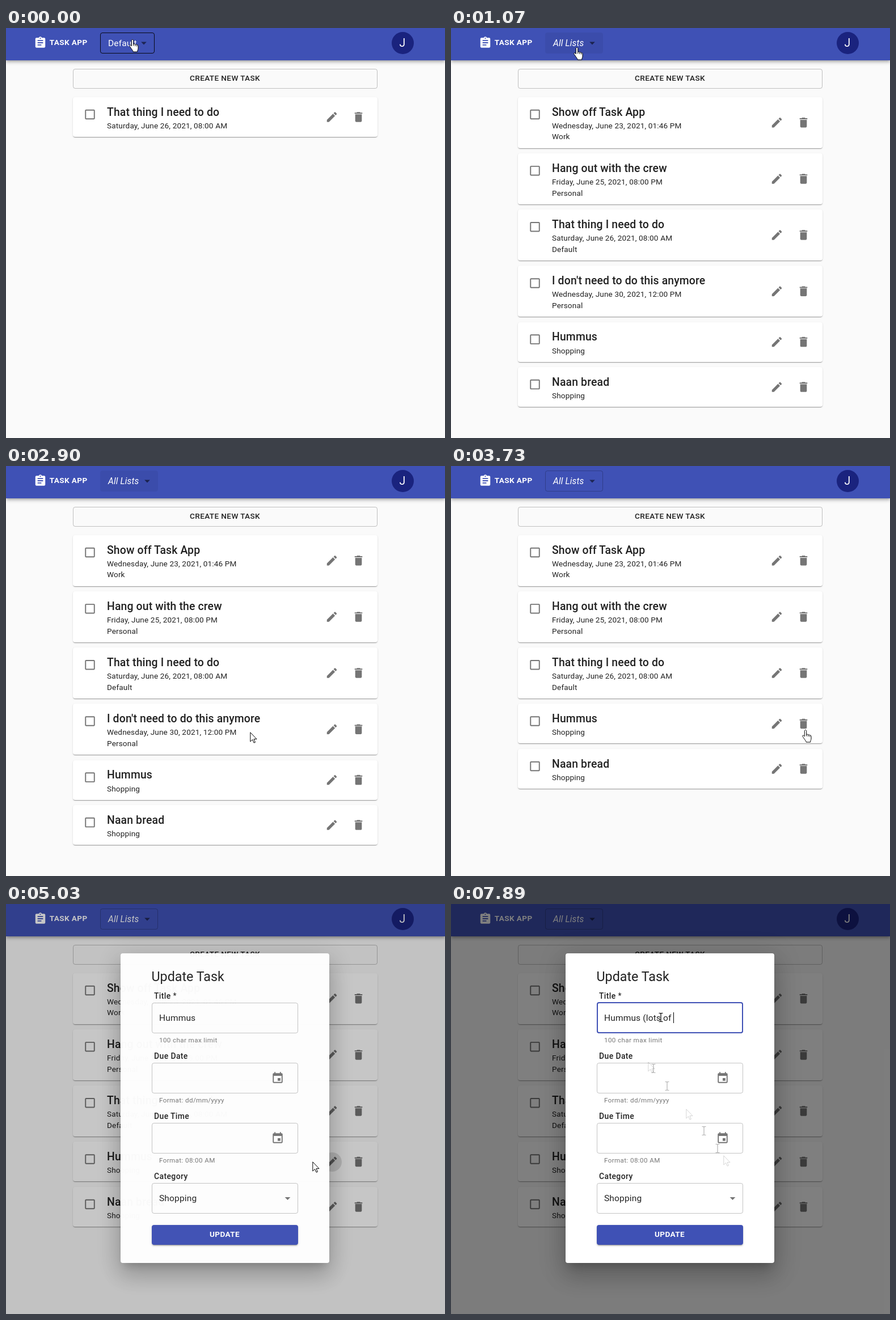
These frames come from a looping animation (774 by 723 pixels, 8 s). An HTML page:

```html
<!DOCTYPE html>
<html lang="en">
<head>
<meta charset="utf-8">
<title>Task App</title>
<style>
html, body { margin: 0; width: 100%; height: 100%; overflow: hidden; background: #fafafa; }
#stage { position: relative; width: 774px; height: 723px; overflow: hidden; background: #fafafa; font-family: Roboto, sans-serif; }
#stage div, #stage svg { position: absolute; box-sizing: border-box; }
#stage svg { left: 0; top: 0; overflow: visible; }
#stage .layer { inset: 0; }
.paper { background: #fff; border-radius: 4px; }
.card { box-shadow: 0 2px 1px -1px rgba(0,0,0,.2), 0 1px 1px rgba(0,0,0,.14), 0 1px 3px rgba(0,0,0,.12); }
.bar { background: #3f51b5; box-shadow: 0 2px 4px -1px rgba(0,0,0,.2), 0 4px 5px rgba(0,0,0,.14), 0 1px 10px rgba(0,0,0,.12); }
.popup { box-shadow: 0 5px 5px -3px rgba(0,0,0,.2), 0 8px 10px 1px rgba(0,0,0,.14), 0 3px 14px 2px rgba(0,0,0,.12); }
.dialog { box-shadow: 0 11px 15px -7px rgba(0,0,0,.2), 0 24px 38px 3px rgba(0,0,0,.14), 0 9px 46px 8px rgba(0,0,0,.12); }
.submit { background: #3f51b5; border-radius: 4px; box-shadow: 0 3px 1px -2px rgba(0,0,0,.2), 0 2px 2px rgba(0,0,0,.14), 0 1px 5px rgba(0,0,0,.12); }
.outline { border: 1px solid rgba(0,0,0,.23); border-radius: 4px; }
.round { border-radius: 50%; }
</style>
</head>
<body>
<div id="stage"></div>
<script>
const LOOP = 8000;
const ZOOM = .97; // the page is shown slightly reduced
const INK = 'rgba(0,0,0,.87)', SOFT = 'rgba(0,0,0,.54)';

const ICONS = {
  board: 'M19 3h-4.18C14.4 1.84 13.3 1 12 1c-1.3 0-2.4.84-2.82 2H5c-1.1 0-2 .9-2 2v14c0 1.1.9 2 2 2h14c1.1 0 2-.9 2-2V5c0-1.1-.9-2-2-2zm-7 0c.55 0 1 .45 1 1s-.45 1-1 1-1-.45-1-1 .45-1 1-1zm2 14H7v-2h7v2zm3-4H7v-2h10v2zm0-4H7V7h10v2z',
  check: 'M19 5v14H5V5h14m0-2H5c-1.1 0-2 .9-2 2v14c0 1.1.9 2 2 2h14c1.1 0 2-.9 2-2V5c0-1.1-.9-2-2-2z',
  edit: 'M3 17.25V21h3.75L17.81 9.94l-3.75-3.75L3 17.25zM20.71 7.04c.39-.39.39-1.02 0-1.41l-2.34-2.34c-.39-.39-1.02-.39-1.41 0l-1.83 1.83 3.75 3.75 1.83-1.83z',
  trash: 'M6 19c0 1.1.9 2 2 2h8c1.1 0 2-.9 2-2V7H6v12zM19 4h-3.5l-1-1h-5l-1 1H5v2h14V4z',
  event: 'M17 12h-5v5h5v-5zM16 1v2H8V1H6v2H5c-1.11 0-1.99.9-1.99 2L3 19c0 1.1.89 2 2 2h14c1.1 0 2-.9 2-2V5c0-1.1-.9-2-2-2h-1V1h-2zm3 18H5V8h14v11z',
  down: 'M7 10l5 5 5-5z'
};

// Each pointer has its hot spot at 0,0.
const POINTERS = {
  hand: '<path fill="#fff" stroke="#000" stroke-linejoin="round" d="M0 .5c1 0 1.7.7 1.7 1.7V8.5c.3-.7 3-.5 3.1.8.5-.8 2.8-.5 2.9.8.8-.6 2.3-.2 2.3 1.6V16c0 2-1.4 3.3-1.4 6H1.2c0-1.8-2-3.6-3.2-5.6-1-1.7-2.8-3.8-3.2-4.9-.4-1.5 1.6-2 2.5-.8l1 1.1V2.2C-1.7 1.2-1 .5 0 .5zM1.7 8.5v3M4.8 9.500v2.500M7.700 10.500v2"/>',
  arrow: '<path fill="#fff" stroke="#000" d="M.8.8V17l3.800-3.600 2.500 5.800 2.300-1L7 12.600h5z"/>',
  beam: '<path fill="none" stroke="#000" stroke-width="1.200" d="M-3.500-7.500H-1l1 1 1-1h2.500M0-6.500v13M-3.500 7.500H-1l1-1 1 1h2.500"/>'
};

const svg = (inner, css = '') => `<svg width="1" height="1" style="${css}">${inner}</svg>`;
const box = (x, y, w, h, cls = '', css = '') =>
  `<div class="${cls}" style="left:${x}px;top:${y}px;width:${w}px;height:${h}px;${css}"></div>`;
const icon = (name, cx, cy, fill = SOFT) =>
  svg(`<path d="${ICONS[name]}" fill="${fill}" transform="translate(${cx} ${cy}) scale(${ZOOM}) translate(-12 -12)"/>`);
const text = (str, x, y, size, { weight = 400, fill = INK, space = .15, extra = '' } = {}) =>
  svg(`<text x="${x}" y="${y}" font-size="${size * ZOOM}" font-weight="${weight}" fill="${fill}" letter-spacing="${space * ZOOM}" ${extra}>${str}</text>`);
const layer = (id, html) => `<div class="layer" id="${id}">${html}</div>`;

const CENTER = 'text-anchor="middle"', ITALIC = 'font-style="italic"';
const caption = (str, x, y, weight, fill) => text(str, x, y, 14, { weight, fill, space: .4, extra: CENTER });

const select = (label, width, css, extra = '') =>
  box(166, 8, width, 37, 'outline', css) +
  text(label, 180, 32, 16, { fill: '#fff', extra }) +
  icon('down', 147 + width, 26.5);

function card([title, ...lines], top) {
  const height = lines.length > 1 ? 89.5 : 70;
  const middle = top + height / 2;
  return box(118, top, 537, height, 'paper card') +
    icon('check', 148, top + 30.5) +
    text(title, 178, Math.round(top + 32.6), 20, { weight: 500 }) +
    lines.map((line, i) => text(line, 178, Math.round(top + 55 + i * 19.4), 14)).join('') +
    icon('edit', 574.5, middle) + icon('trash', 621.5, middle);
}

function cards(tasks) {
  let top = 122;
  return tasks.map(task => {
    const html = card(task, top);
    top += task.length > 2 ? 99.15 : 79.5;
    return html;
  }).join('');
}

function field(label, row, helper, inner = '') {
  const y = 174 + row * 106;
  return text(label, 261, y - 7, 14.4, { weight: 500, space: .4 }) +
    box(257, y, 258, 54, 'outline') +
    text(helper, 270, y + 70, 12, { fill: SOFT, space: .4 }) + inner;
}

const thing = ['That thing I need to do', 'Saturday, June 26, 2021, 08:00 AM'];
const dropped = ["I don't need to do this anymore", 'Wednesday, June 30, 2021, 12:00 PM', 'Personal'];
const tasks = [
  ['Show off Task App', 'Wednesday, June 23, 2021, 01:46 PM', 'Work'],
  ['Hang out with the crew', 'Friday, June 25, 2021, 08:00 PM', 'Personal'],
  [...thing, 'Default'],
  dropped,
  ['Hummus', 'Shopping'],
  ['Naan bread', 'Shopping']
];
const menuItems = ['All Lists', 'Default', 'Personal', 'School', 'Shopping', 'Work'];
const menuItem = (item, i) =>
  box(166, 24 + i * 35, 98, 35, '', `background:rgba(0,0,0,${[.04, .08][i] || 0})`) +
  text(item, 182, 47 + i * 35, 16, { extra: i ? '' : ITALIC });

const clamp = v => Math.max(0, Math.min(1, v));
const progress = (t, from, to) => clamp((t - from) / (to - from));
const smooth = p => p * p * (3 - 2 * p);
const show = (node, on) => { node.style.visibility = on ? 'visible' : 'hidden'; };

// Pointer moves: start, end, x, y.
const SWEEP_START = 5120, SWEEP_END = 5400;
const moves = [
  [30, 500, 222, 34],
  [1220, 2020, 305, 370],
  [2050, 2490, 399, 470],
  [2720, 3500, 625, 465],
  [4060, 4320, 589, 465],
  [4450, 4600, 582, 461],
  [4960, SWEEP_START, 480, 443],
  [SWEEP_START, SWEEP_END, 347, 278],
  [SWEEP_END, 5600, 370, 200]
];

const pointerAt = t => moves.reduce(([x, y], [from, to, toX, toY]) => {
  const p = smooth(progress(t, from, to));
  return [x + (toX - x) * p, y + (toY - y) * p];
}, [223, 20]);

function pointerKind([x, y], t) {
  if (t > 4980) {
    const row = (y - 174) % 106;
    return x > 257 && x < 515 && row >= 0 && row < 54 ? 'beam' : 'arrow';
  }
  const onSelect = y < 45, onCreate = y > 72 && y < 107, onButtons = x > 550 && y > 122;
  if (onSelect || onCreate || onButtons) return 'hand';
  const row = (y - 122) % 99;
  return y > 122 && x < 406 && row > 14 && row < 62 ? 'beam' : 'arrow';
}

// Faint prints the pointer leaves on the dialog at an even beat.
const prints = Array.from({ length: 7 }, (_, i) => {
  const time = SWEEP_START + (SWEEP_END - SWEEP_START) * i / 6;
  const spot = pointerAt(time), kind = pointerKind(spot, time);
  return { time, html: svg(POINTERS[kind], `left:${spot[0]}px;top:${spot[1]}px;opacity:${kind === 'beam' ? .3 : .16}`) };
});

// Hesitant at first with growing pauses, then a steady rhythm.
const phrase = 'Hummus (lots of ', typedBefore = 6;
const keyTime = n => n < 3 ? 6070 + 400 * (1.5 ** n - 1) : 7050 + 140 * (n - 3);

function typedLength(t) {
  let n = 0;
  while (typedBefore + n < phrase.length && keyTime(n) <= t) n++;
  return typedBefore + n;
}

const stage = document.getElementById('stage');
stage.innerHTML =
  box(0, 0, 774, 57, 'bar') +
  icon('board', 60.5, 26, '#fff') +
  caption('TASK APP', 110.2, 30, 700, '#fff') +
  box(679.5, 6.5, 39, 39, 'round', 'background:#1a237e') +
  text('J', 699, 33, 20, { fill: '#fff', extra: CENTER }) +
  box(118, 72, 537, 35, 'outline') +
  caption('CREATE NEW TASK', 386, 93, 500) +
  layer('single', select('Default', 96, `border-color:${INK}`) + cards([thing])) +
  layer('all', select('All Lists', 102, 'border-color:transparent;background:rgba(0,0,30,.06)', ITALIC) + cards(tasks)) +
  layer('fewer', select('All Lists', 102, '', ITALIC) + cards(tasks.filter(task => task !== dropped))) +
  layer('menu', box(166, 16, 98, 16 + menuItems.length * 35, 'paper popup') + menuItems.map(menuItem).join('')) +
  layer('ripple', box(557.5, 438, 34, 34, 'round', 'background:rgba(0,0,0,.13)')) +
  layer('shade', '') +
  layer('dialog', box(202, 87, 368, 546, 'paper dialog') +
    text('Update Task', 256.5, 136, 24, { space: 0 }) +
    field('Title <tspan font-weight="400">*</tspan>', 0, '100 char max limit') +
    field('Due Date', 1, 'Format: dd/mm/yyyy', icon('event', 479, 307)) +
    field('Due Time', 2, 'Format: 08:00 AM', icon('event', 479, 413)) +
    field('Category', 3, '', text('Shopping', 270, 524, 16) + icon('down', 496.5, 519)) +
    box(257, 566, 258, 34.5, 'submit') +
    caption('UPDATE', 385.5, 587, 700, '#fff') +
    text('', 270, 206, 16, { extra: 'id="typed"' })) +
  layer('focus', box(257, 173, 258, 55, '', 'border:2px solid #3f51b5;border-radius:4px') +
    '<div id="caret" style="top:191px;width:1px;height:19px;background:#000"></div>') +
  layer('trail', prints.map(print => print.html).join('')) +
  Object.keys(POINTERS).map(kind => layer(kind, svg(POINTERS[kind]))).join('');

const el = Object.fromEntries([...stage.querySelectorAll('[id]')].map(node => [node.id, node]));
el.menu.style.transformOrigin = '216px 26px';
el.ripple.style.transformOrigin = '574.5px 455px';

function render(t) {
  show(el.single, t < 740);
  show(el.all, t >= 740 && t < 3660);
  show(el.fewer, t >= 3660);

  const open = smooth(progress(t, 30, 290)) * (1 - smooth(progress(t, 710, 960)));
  el.menu.style.opacity = open;
  el.menu.style.transform = open < 1 ? `scale(${.75 + .25 * open}, ${.5625 + .4375 * open})` : 'none';

  show(el.ripple, t >= 4820 && t < 5150);
  el.ripple.style.transform = `scale(${.4 + .6 * progress(t, 4820, 4980)})`;
  el.shade.style.background = `rgba(0,0,0,${.5 * progress(t, 4940, 5145)})`;
  el.dialog.style.opacity = progress(t, 4900, 5034);

  el.typed.textContent = phrase.slice(0, typedLength(t)).replace(/ /g, '\u00a0');
  el.caret.style.left = Math.floor(270 + el.typed.getComputedTextLength()) + 'px';
  show(el.focus, t >= 5630);
  prints.forEach(({ time }, i) => show(el.trail.children[i], t > time + 30));

  const spot = pointerAt(t), kind = pointerKind(spot, t);
  for (const name in POINTERS) {
    show(el[name], name === kind);
    el[name].style.transform = `translate(${spot.map(v => Math.round(v) + 'px')})`;
  }
}

const start = performance.now();
function tick() {
  render((performance.now() - start) % LOOP);
  requestAnimationFrame(tick);
}
tick();
</script>
</body>
</html>
```
